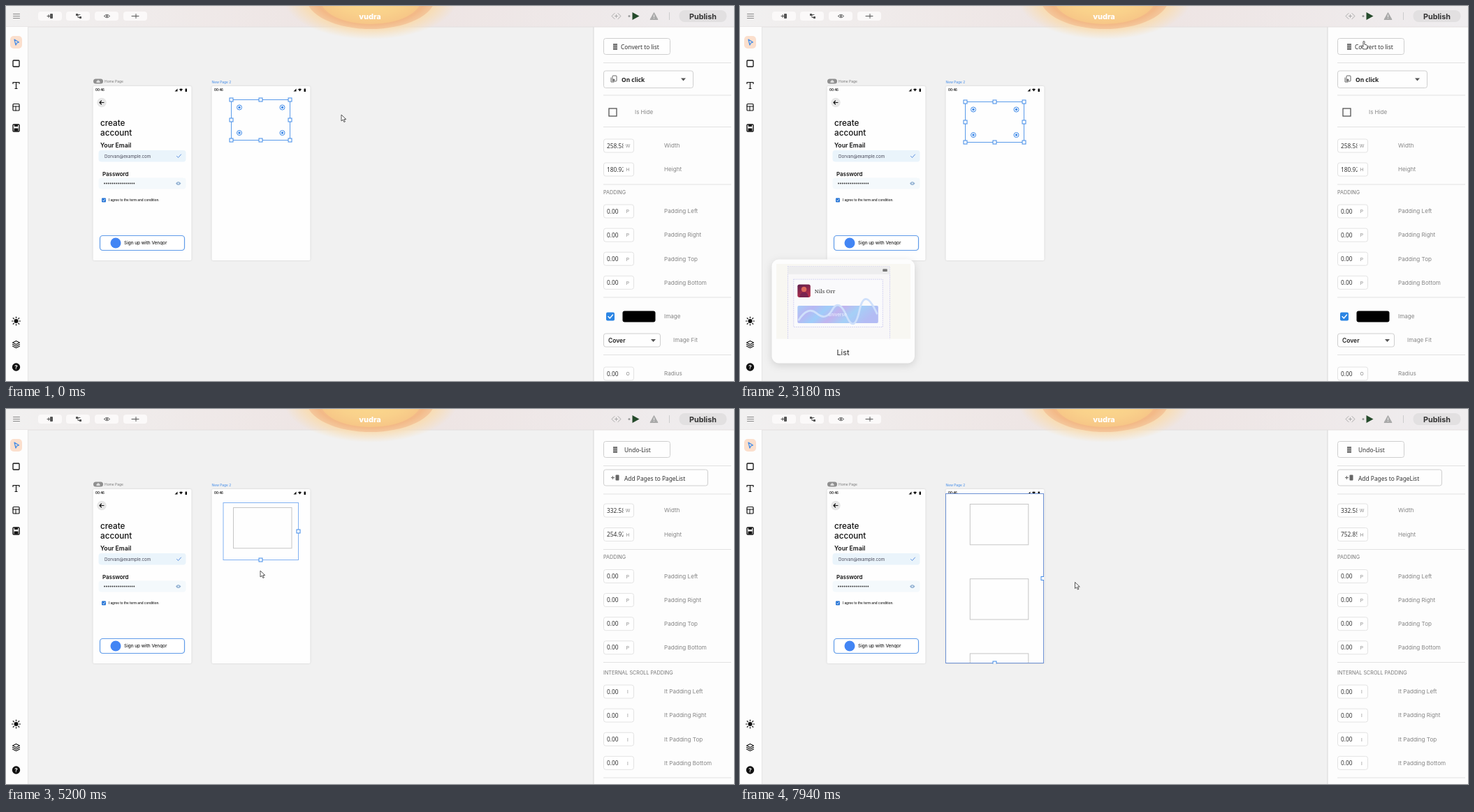
These frames come from a looping animation (1042 by 538 pixels, 8 s). An HTML page:

```html
<!DOCTYPE html>
<html lang="en">
<head>
<meta charset="utf-8">
<title>App builder</title>
<style>
  html, body { margin: 0; width: 100%; height: 100%; overflow: hidden; background: #f1f1f1; }
  svg { display: block; }
  #stage { width: 100vw; height: 100vh; }
  text { font-family: Inter, sans-serif; fill: #111; white-space: pre; }
  .ui { font-family: "Noto Sans", sans-serif; fill: #333; }
  .serif { font-family: "Noto Serif", serif; }
  #card { filter: drop-shadow(0 3px 6px rgba(0, 0, 0, .13)); }
</style>
</head>
<body>
<svg id="stage" viewBox="0 0 1042 538" preserveAspectRatio="none"></svg>
<script>
const stage = document.getElementById('stage');
const BLUE = '#3f8ae8', LINE = '#e2e2e2', GREY = '#858585';

// Markup helpers
const rect = (x, y, w, h, fill, r = 0, extra = '') =>
  `<rect x="${x}" y="${y}" width="${w}" height="${h}" rx="${r}" fill="${fill}" ${extra}/>`;
const outline = (x, y, w, h, stroke, r = 0, width = 1, fill = 'none') =>
  rect(x, y, w, h, fill, r, `stroke="${stroke}" stroke-width="${width}"`);
const circle = (x, y, r, fill, extra = '') => `<circle cx="${x}" cy="${y}" r="${r}" fill="${fill}" ${extra}/>`;
const line = (d, stroke = '#222', width = 1) =>
  `<path d="${d}" fill="none" stroke="${stroke}" stroke-width="${width}" stroke-linejoin="round" stroke-linecap="round"/>`;
const shape = (d, fill, extra = '') => `<path d="${d}" fill="${fill}" ${extra}/>`;
const text = (x, y, size, str, fill = '#111', weight = 400, extra = '') =>
  `<text x="${x}" y="${y}" font-size="${size}" font-weight="${weight}" style="fill:${fill}" ${extra}>${str}</text>`;
const ui = (x, y, str, weight = 400, fill = '#333') => text(x, y, 8.4, str, fill, weight, 'class="ui"');
const group = (id, body, extra = '') => `<g id="${id}" ${extra}>${body}</g>`;
const clip = (x, y, w, h, body) =>
  `<svg x="${x}" y="${y}" width="${w}" height="${h}" viewBox="${x} ${y} ${w} ${h}">${body}</svg>`;
const handle = (x, y) => outline(x - 2.5, y - 2.5, 5, 5, BLUE, 0, 1, '#fff');
const divider = y => rect(855, y, 183, 1, LINE);

const defs = `<defs>
  <linearGradient id="bar"><stop stop-color="#f1f0f0"/><stop offset=".42" stop-color="#eee5e4"/>
    <stop offset=".6" stop-color="#eee5e4"/><stop offset="1" stop-color="#efedef"/></linearGradient>
  <radialGradient id="glow"><stop offset=".2" stop-color="#fbdc92"/><stop offset=".55" stop-color="#f8cf8f"/>
    <stop offset=".85" stop-color="#f3b987"/><stop offset="1" stop-color="#f4c79c"/></radialGradient>
  <radialGradient id="halo"><stop offset=".72" stop-color="#f9dcb0"/><stop offset="1" stop-color="#f9dcb0" stop-opacity="0"/></radialGradient>
  <linearGradient id="wave" x2="1" y2=".25"><stop stop-color="#a9cdf8"/><stop offset=".2" stop-color="#b8b7f3"/>
    <stop offset=".38" stop-color="#9fcdf9"/><stop offset=".55" stop-color="#c2b4ee"/>
    <stop offset=".75" stop-color="#a5d0f7"/><stop offset="1" stop-color="#b4bcf4"/></linearGradient>
  <linearGradient id="face" x2=".4" y2="1"><stop stop-color="#5d1e4c"/><stop offset="1" stop-color="#b52f4c"/></linearGradient>
</defs>`;

function header() {
  const icon = '#555', soft = '#aaa';
  return clip(0, 0, 1042, 60,
      rect(0, 0, 1042, 30, 'url(#bar)') + rect(0, 29.5, 1042, 1, '#e3e0e0') +
      `<ellipse cx="522" cy="-12" rx="125" ry="60" fill="url(#halo)"/>` +
      `<ellipse cx="522" cy="-12" rx="92" ry="45" fill="url(#glow)"/>` +
      `<ellipse cx="522" cy="-10" rx="72" ry="36" fill="#fbd488" opacity=".5"/>`) +
    text(521, 18.5, 11, 'vudra', '#fff', 800, 'text-anchor="middle"') +
    line('M10.500 11.500h9M10.500 14.500h9M10.500 17.500h9', '#888') +
    [46, 86, 127, 168].map(x => rect(x, 8, 34, 13, '#fbf9f9', 4)).join('') +
    line('M59 14.500h4M61 12.500v4', icon) + rect(63, 11, 4, 7, icon, 1) +
    line('M101 12.500h5M103 12.500v4h4', icon) + rect(100, 11, 3, 3, icon) + rect(105, 15, 3, 3, icon) +
    line('M140.500 14.500q4-4.500 8 0q-4 4.500-8 0', icon) + circle(144.500, 14.500, 1.3, icon) +
    line('M180 14.500h10M186 11.500v6', icon) +
    line('M871 10.500l-4 4 4 4M876 10.500l4 4-4 4M871.500 14.500h4M873.500 12.500v4', soft) +
    circle(892, 14.500, 1.5, '#999') + shape('M896.500 9l10 5.500-10 5.500z', '#254a2b') +
    shape('M927.500 9.500l5.500 10h-11z', '#aaa', 'stroke="#aaa" stroke-linejoin="round"') +
    rect(927, 12.500, 1, 3.500, '#eee') + rect(927, 17, 1, 1, '#eee') +
    rect(949, 9, 1, 11, '#ccc') + rect(963.500, 6, 68, 17, '#e2e0e1', 8) +
    text(997.500, 18.500, 10.800, 'Publish', '#333', 700, 'text-anchor="middle"');
}

function sidebar() {
  const ink = '#111';
  const rays = Array.from({ length: 8 }, (_, i) => {
    const a = i * Math.PI / 4, c = Math.cos(a), s = Math.sin(a);
    return `M${14.5 + 4.5 * c} ${452 + 4.5 * s}L${14.5 + 6 * c} ${452 + 6 * s}`;
  }).join('');
  return rect(0, 30, 31, 508, '#fdfdfd') + rect(31, 30, 1, 508, '#e6e6e6') +
    rect(6, 43, 17, 18, '#fbdfcd', 5) + line('M12 48l6.500 4-3 1-1.500 3z', BLUE, 1.2) +
    outline(10, 78, 9, 9, ink, 1, 1.3) + line('M10 111.500v-2h9v2M14.500 109.500v9M13 118.500h3', ink, 1.2) +
    outline(10, 140.500, 9, 9.500, ink, 1, 1.2) + line('M10 144h9M14 144v6', ink) +
    outline(10, 170, 9, 10, ink, 1, 1.4) + rect(12, 170, 5, 3, ink) + rect(11.500, 175.500, 6, 4, ink) +
    circle(14.500, 452, 3, ink) + line(rays, ink, 1.2) +
    line('M14.500 480.500l5 2.500-5 2.500-5-2.500zM9.500 485.500l5 2.500 5-2.500M9.500 488l5 2.500 5-2.500', ink, 1.1) +
    circle(14.500, 518, 5.700, ink) + text(14.500, 521, 8, '?', '#fff', 700, 'text-anchor="middle"');
}

const phone = x => rect(x, 115, 141, 250, '#fefefe', 2, 'style="filter:drop-shadow(0 0 1px #ccc)"') +
  text(x + 3.500, 122, 4.400, '00:46', '#111', 600) +
  shape(`M${x + 117} 122.500h4v-4zM${x + 123.500} 119.500q2.500-2 5 0l-2.500 3z`, '#111') +
  rect(x + 132, 118.500, 2.500, 4.500, '#111', .5);

function signUpPage() {
  return rect(125, 104.500, 14, 7, '#8f8f8f', 3.500) + shape('M129.500 108l2.500-2 2.500 2v2h-5z', '#ddd') +
    text(141, 110, 4.900, 'Home Page', '#777') + phone(124.500) +
    circle(137, 138.500, 6.700, '#e7e7e7') + line('M140 138.500h-6M136.500 136l-2.500 2.500 2.500 2.500', '#111', 1.1) +
    text(135, 171.500, 11.700, 'create', '#111', 500) + text(135, 185.500, 11.700, 'account', '#111', 500) +
    text(135, 203, 8.700, 'Your Email', '#111', 600) +
    rect(132.500, 207, 125, 16.500, '#eaf4fb', 4) + text(141, 217.500, 6.200, 'Dorvan@example.com', '#445') +
    line('M244.500 215.500l2 2 4-4.500', '#5b8fe0') +
    text(138, 243.500, 7.900, 'Password', '#111', 600) + rect(132.500, 246.500, 125, 16, '#f4f9fc', 4) +
    Array.from({ length: 16 }, (_, i) => circle(141 + i * 2.820, 254.500, .95, '#333')).join('') +
    shape('M243 254.500q3.500-5 7.500 0q-4 5-7.500 0', '#8faed0') + circle(246.700, 254.500, 1.2, '#dbe8f4') +
    rect(137, 275.500, 6, 6, '#2876d6', 1) + line('M138.500 278.500l1.200 1.300 2-2.500', '#fff', .8) +
    text(147, 280.200, 4.600, 'I agree to the term and condition.', '#111', 500) +
    outline(134.500, 329.500, 121, 21, '#5f9be9', 4, 1.2, '#fff') + circle(157, 340, 7.500, '#4285f4') +
    text(169, 342.300, 6.400, 'Sign up with Venqor', '#222', 500);
}

function newPage() {
  const dots = [[334, 145.5], [395.5, 145.5], [334, 182], [395.5, 182]];
  const marks = [[322.5, 134.5], [364.5, 134.5], [406.5, 134.5], [322.5, 163.5], [406.5, 163.5],
    [322.5, 192.5], [364.5, 192.5], [406.5, 192.5]];
  const selection = outline(322.5, 134.5, 84, 58, '#5a9bea') + marks.map(p => handle(...p)).join('') +
    dots.map(([x, y]) => circle(x, y, 3.5, '#fff', `stroke="${BLUE}"`) + circle(x, y, 1.7, BLUE)).join('');
  return text(294.500, 110.500, 4.850, 'New Page 2', '#3f8ae8') + phone(294.500) +
    group('selection', selection) +
    clip(294, 115, 141, 250.500, group('list', ''));
}

const button = (y, w, label, x) => outline(855.5, y, w, 23, '#cfcfcf', 3, 1, '#fefefe') + ui(x, y + 15.500, label);
const stackIcon = y => rect(869, y - 4.500, 6, 9, '#777') + line(`M869 ${y - 1.500}h6M869 ${y + 1.500}h6`, '#ccc', .7);
const field = (y, value, unit, label, id = '') =>
  outline(855.5, y - 9.500, 43, 19, '#e3e3e3', 3, 1, '#fff') +
  clip(859, y - 8, 24.500, 16, text(860, y + 3, 8.4, value, '#333', 400, `class="ui" ${id && `id="${id}"`}`)) +
  text(890, y + 2.800, 6.800, unit, '#888', 400, 'text-anchor="middle"') + text(942, y + 2.800, 8.100, label, GREY);
const paddings = (y, unit, prefix, pitch = 34.1) => ['Left', 'Right', 'Top', 'Bottom']
  .map((side, i) => field(y + i * pitch, '0.00', unit, `${prefix}Padding ${side}`)).join('');
const arrowDown = (x, y) => shape(`M${x - 3.5} ${y - 1.5}h7l-3.5 4z`, '#555');

function shapePanel() {
  return button(46.5, 95, 'Convert to list', 880) + stackIcon(58.500) +
    outline(855.5, 93, 128, 24.500, '#cfcfcf', 3, 1, '#fefefe') +
    outline(868, 100, 6, 8, '#666', 1) + line('M866 103v6h4', '#666') + circle(870, 106, 1.5, '#666') +
    ui(881, 108.500, 'On click', 600, '#222') + arrowDown(969.500, 105) +
    outline(863, 147, 11, 11, '#555', 0, 1.3) + text(900, 155.300, 8, 'Is Hide', GREY) +
    field(200.500, '258.58', 'W', 'Width') + field(234.500, '180.92', 'H', 'Height') +
    text(855, 269.700, 7.200, 'PADDING', '#777') + paddings(294.500, 'P', '') +
    rect(859, 439.500, 12, 12, '#2b85e4', 2) + line('M862 445.500l2.300 2.500 4.200-5', '#fff', 1.4) +
    rect(882.500, 437.500, 47, 16, '#000', 3) + text(942, 448.300, 8.100, 'Image', GREY) +
    outline(855.5, 470, 81, 19, '#cfcfcf', 3, 1, '#fefefe') + text(862, 482.500, 8.500, 'Cover', '#222', 600) +
    arrowDown(926.500, 479.500) + text(955, 482.300, 8, 'Image Fit', GREY) +
    field(527.500, '0.00', 'O', 'Radius') + [81, 127.5, 173, 255.5, 417.5, 500].map(divider).join('');
}

function listPanel() {
  return button(46.5, 95, 'Undo-List', 885) + stackIcon(58.500) +
    button(87, 149, 'Add Pages to PageList', 885) +
    rect(872.500, 94.500, 5, 8, '#666', 1) + line('M866.500 98.500h4M868.500 96.500v4', '#666') +
    field(145.500, '332.58', 'W', 'Width') + field(180, '254.92', 'H', 'Height', 'listHeight') +
    text(855, 214.700, 7.200, 'PADDING', '#777') + paddings(240, 'P', '') +
    text(855, 380.700, 7.200, 'INTERNAL SCROLL PADDING', '#777') + paddings(405.500, 'I', 'It ') +
    [81, 121.5, 201, 363, 528.5].map(divider).join('');
}

function previewCard() {
  const dash = 'stroke="#b9b7ec" stroke-width=".8" stroke-dasharray="1.5 1.5"';
  const scene = rect(69, 374, 158, 300, '#f8f7f8', 0, dash) + rect(69, 374, 158, 12, '#ededee') +
    rect(216, 378, 7, 4, '#777', 1) +
    rect(78, 394, 138, 74, '#fafafc', 0, dash) + rect(84, 402, 20, 20, 'url(#face)', 3) +
    circle(94, 409.500, 4, '#dd6a5c') + shape('M87 422q1-8 7-8t7 8z', '#7a2450') +
    text(110.500, 416, 8.500, 'Nils Orr', '#333', 400, 'class="serif"') +
    rect(84, 435, 125, 27, 'url(#wave)', 2) +
    line('M86 457q14-22 28-10t24-6 22 10 20-9 27 5', '#cfe0fb', 3) +
    text(146, 451, 7, 'universe', '#eef3ff', 400, 'text-anchor="middle"');
  const editor = rect(52, 370, 192, 2.500, '#e4e6ee') +
    line('M54 377v20M54 474h1', '#99a', .8) + line('M206.500 374v103', '#d6d6e8', .6) +
    line('M210 381h13', '#aaa', .7) + circle(228, 381, 1.3, '#5b8fe0');
  return rect(45.5, 363.5, 204.500, 149, '#fdfdfd', 10) +
    clip(52, 370, 192, 107.500, rect(52, 370, 192, 108, '#f8f7f2') + group('editor', editor) +
      group('scene', scene) + group('miniCursor', shape('M156 454l4 3-2 .5-1 2z', '#555')) +
      rect(121, 463.500, 62, 9.500, '#bdbdbd', 3, 'id="toast"')) +
    text(147.500, 501, 10.800, 'List', '#222', 400, 'text-anchor="middle"');
}

const cursors =
  group('arrow', shape('M0 0v9l2.200-1.900 1.700 3.400 1.500-.7-1.600-3.300h3z', '#fff', 'stroke="#444" stroke-width=".9"')) +
  group('hand', shape('M-1 1q1-2 2 0v4l3 .8q1.500.5 1 3l-.8 3h-5l-3-4.500q.5-1.500 1.800 0l1 1z', '#fff', 'stroke="#444" stroke-width=".9"'));

stage.innerHTML = defs + rect(0, 0, 1042, 538, '#f1f1f1') + signUpPage() + newPage() +
  rect(841, 30, 201, 508, '#fdfdfd') + rect(840.500, 30, 1, 508, '#d8d8d8') +
  group('shapePanel', shapePanel()) + group('listPanel', listPanel()) +
  header() + sidebar() + group('card', previewCard()) + cursors;

// Timeline: each track is a list of [time, ...values], eased between stops
const LOOP = 8000, CONVERT = 3900;
const tracks = {
  cursor: [[70, 480, 156], [600, 922, 61], [820, 879, 59], [1320, 878, 58], [1680, 878, 58], [1850, 892, 56],
    [2950, 892, 56], [3200, 893, 50], [3500, 892, 56], [3950, 892, 56], [4500, 385, 185], [4920, 375, 203],
    [5190, 364, 232], [5400, 364, 232], [5600, 364, 217], [5810, 364, 226], [6330, 358, 375], [6560, 356, 366],
    [6650, 356, 366], [7300, 418, 242], [7500, 418, 242], [7760, 468, 246], [7930, 479.5, 248.5]],
  nudge: [[70, 0], [280, 3]],
  card: [[620, 0], [770, 1], [3880, 1], [4020, 0]],
  zoom: [[1400, .355, 91.2, 243.6], [1850, 1, 0, 0], [2950, 1, 0, 0], [3550, .77, 14.3, 85]],
  vertical: [[5600, 134.5, 216.5], [5810, 134.5, 224], [6150, 134.5, 330], [6320, 121.5, 364.5]],
  widen: [[7540, 0], [7760, 1]],
};

function sample(track, t) {
  const next = track.findIndex(stop => stop[0] > t);
  if (next < 0) return track.at(-1).slice(1);
  if (next === 0) return track[0].slice(1);
  const a = track[next - 1], b = track[next];
  const k = (t - a[0]) / (b[0] - a[0]), ease = k * k * (3 - 2 * k);
  return a.slice(1).map((v, i) => v + (b[i + 1] - v) * ease);
}

const el = id => document.getElementById(id);
const show = (id, visible) => el(id).setAttribute('visibility', visible ? 'visible' : 'hidden');
const transform = (id, value) => el(id).setAttribute('transform', value);

function drawList(t) {
  if (t < CONVERT) return '';
  const [top, bottom] = sample(tracks.vertical, t), [wide] = sample(tracks.widen, t);
  const mix = (a, b) => a + (b - a) * wide;
  const left = mix(311, 294.5), right = mix(418.5, 434.5), height = bottom - top;
  const items = [0, 1, 2].map(i =>
    outline(mix(325.5, 329.3), top + mix(7, 15) + i * mix(82.4, 107.2), 83.5, 58.3, '#c6c6c6')).join('');
  return rect(left, top, right - left, height, '#fefefe') + clip(left, top, right - left, height, items) +
    outline(left, top, right - left, height, t < 5600 ? '#82b2f2' : '#6d91d4') +
    (t < 4660 ? '' : handle(right - wide, (top + bottom) / 2) + handle(364.5, bottom));
}

function render(now) {
  const t = now % LOOP;
  const [x, y] = sample(tracks.cursor, t), [zoom, dx, dy] = sample(tracks.zoom, t);
  const overButton = x > 855 && x < 951 && y < 70;
  show('hand', overButton);
  show('arrow', !overButton);
  transform('hand', `translate(${x} ${y})`);
  transform('arrow', `translate(${x} ${y})`);

  show('selection', t < CONVERT);
  transform('selection', `translate(0 ${sample(tracks.nudge, t)[0]})`);
  show('shapePanel', t < CONVERT);
  show('listPanel', t >= CONVERT);
  el('list').innerHTML = drawList(t);
  el('listHeight').textContent = t < 6760 ? '254.92' : '752.85';

  el('card').setAttribute('opacity', sample(tracks.card, t)[0]);
  transform('scene', `translate(${dx} ${dy}) scale(${zoom})`);
  el('editor').setAttribute('opacity', t < 1850 ? Math.max(0, 1 - (zoom - .355) * 3) : 0);
  show('miniCursor', t > 1850 && t < 2950);
  show('toast', t > 3400);
  requestAnimationFrame(() => render(performance.now()));
}
render(0);
</script>
</body>
</html>
```
